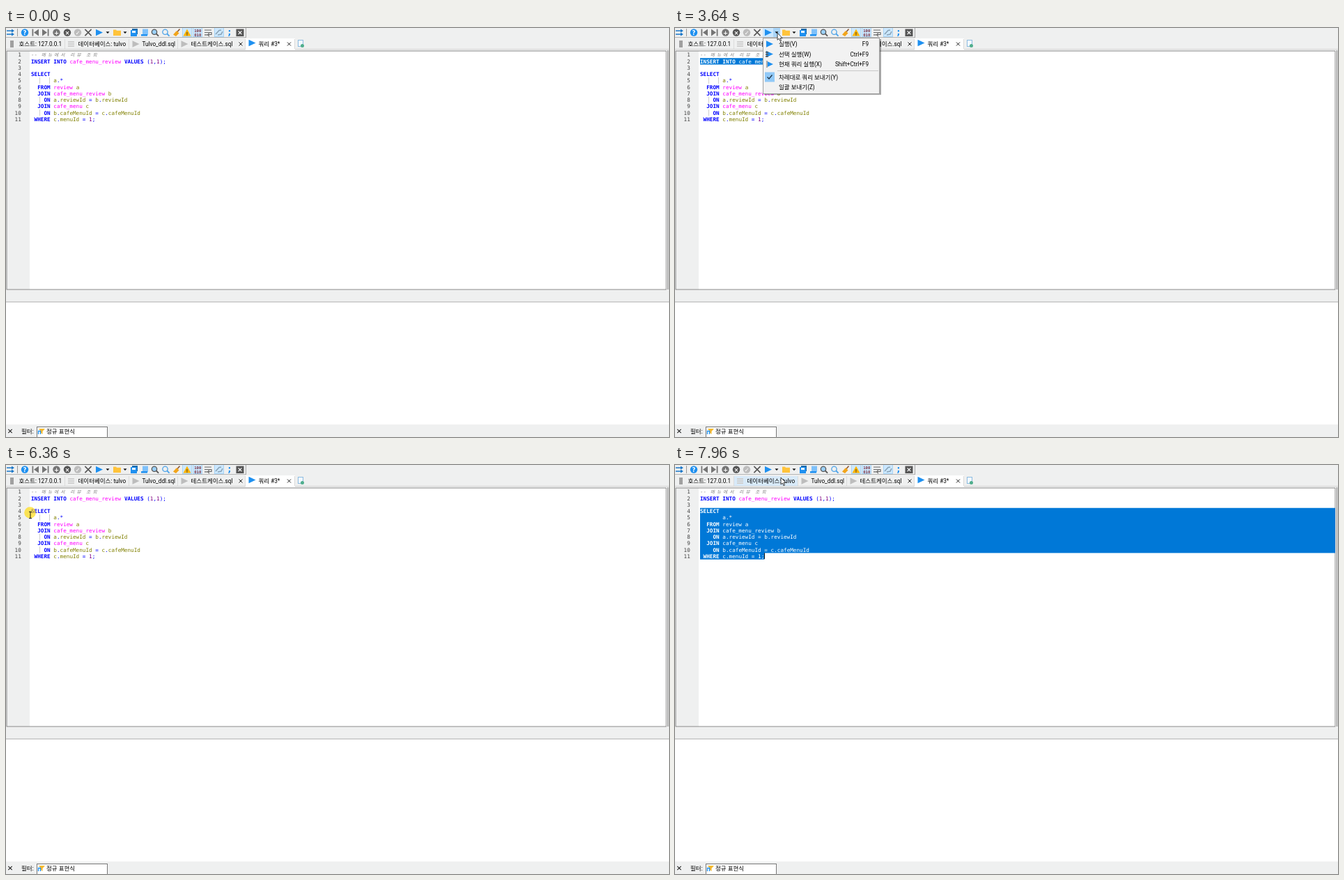
Recreate the animation shown at these times as an HTML page with a canvas. Size 952x588 px, loop 8 s.

```html
<!DOCTYPE html>
<html lang="ko">
<head>
<meta charset="utf-8">
<style>
  html, body { margin: 0; width: 100%; height: 100%; overflow: hidden; background: #fff; }
  canvas { display: block; }
</style>
</head>
<body>
<canvas id="stage" width="952" height="588"></canvas>
<script>
const ctx = document.getElementById('stage').getContext('2d');
const LOOP = 8000;
const CODE_X = 36, CHAR = 4.617, ROW = 9.25, CODE_TOP = 33.9, EDITOR_RIGHT = 948;
const BLUE = '#1e90f0', GRAY = '#757575', BAR = '#eff0f0', SELECT = '#0078d7', HOVER = '#91c9f7';
const HANGUL = '"Noto Sans CJK KR", "Noto Sans CJK JP", sans-serif';
const MONO = '"DejaVu Sans Mono", monospace';

// ---- drawing helpers ----
function box(color, x, y, w, h) {
  ctx.fillStyle = color;
  ctx.fillRect(x, y, w, h);
}
function frame(color, x, y, w, h) {
  ctx.strokeStyle = color;
  ctx.lineWidth = 1;
  ctx.strokeRect(x + .5, y + .5, w - 1, h - 1);
}
function disc(color, x, y, r) {
  ctx.beginPath();
  ctx.arc(x, y, r, 0, 7);
  ctx.fillStyle = color;
  ctx.fill();
}
// SVG path placed at x, y; filled, or stroked when a width is given.
function shape(color, path, x, y, width) {
  ctx.save();
  ctx.translate(x, y);
  ctx.fillStyle = ctx.strokeStyle = color;
  ctx.lineWidth = width;
  width ? ctx.stroke(new Path2D(path)) : ctx.fill(new Path2D(path));
  ctx.restore();
}
function write(text, x, y, color, font, align = 'left') {
  ctx.font = font;
  ctx.fillStyle = color;
  ctx.textAlign = align;
  ctx.fillText(text, x, y);
}
const play = (color, x, y) => shape(color, 'M-4.5-4.7 5.5 0-4.5 4.7z', x, y);
const cross = (color, x, y, r, width = 1.1) =>
  shape(color, `M${-r} ${-r}L${r} ${r}M${-r} ${r}L${r} ${-r}`, x, y, width);

// Interface text: Hangul and Latin runs have their own size.
function label(text, x, y) {
  for (const run of text.match(/[가-힣]+|[^가-힣]+/g) || []) {
    write(run, x, y + 3, '#000', /[가-힣]/.test(run) ? `8.5px ${HANGUL}` : '8.2px Roboto, sans-serif');
    x += ctx.measureText(run).width;
  }
}

// ---- code ----
const CODE = `
INSERT INTO cafe_menu_review VALUES (1,1);

SELECT
       a.*
  FROM review a
  JOIN cafe_menu_review b
    ON a.reviewId = b.reviewId
  JOIN cafe_menu c
    ON b.cafeMenuId = c.cafeMenuId
 WHERE c.menuId = 1;`.split('\n');
const rowTop = row => CODE_TOP + (row - 1) * ROW;
const baseline = row => rowTop(row) + 7.4;
const colX = col => CODE_X + col * CHAR;

function inkOf(token) {
  if (/^[A-Z]+$/.test(token)) return '#0000ff';
  if (/^(cafe_\w+|review)$/.test(token)) return '#ff00ff';
  if (/^\d/.test(token)) return '#800080';
  return /^\w/.test(token) ? '#808000' : '#0000ff';
}
function drawCode(plain) {
  CODE.forEach((text, i) => {
    for (const { 0: token, index } of text.matchAll(/\w+|[^\w\s]+/g)) {
      const weight = /^[A-Z]+$/.test(token) ? 'bold' : 'normal';
      write(token, colX(index), baseline(i + 1), plain || inkOf(token), `${weight} 7.67px ${MONO}`);
    }
  });
}
function drawComment() {
  write('--', CODE_X, baseline(1), '#858585', `italic 7.67px ${MONO}`);
  let col = 3;
  for (const ch of '메뉴에서 리뷰 조회') {
    write(ch, colX(col) + .8, baseline(1) - .4, '#858585', `italic 6.6px ${HANGUL}`);
    col += ch === ' ' ? 1 : 2;
  }
}
function drawSelection({ from, to, col }) {
  ctx.save();
  ctx.beginPath();
  ctx.rect(CODE_X, rowTop(from), EDITOR_RIGHT - CODE_X, (to - from) * ROW);
  ctx.rect(CODE_X, rowTop(to), col * CHAR, ROW);
  ctx.clip();
  box(SELECT, 0, 0, EDITOR_RIGHT, 200);
  drawCode('#fff');
  ctx.restore();
}
function drawEditor(selection, caret) {
  box('#fff', 0, 32, 952, 345);
  box(BAR, 1, 33, 33, 343);
  box(BAR, 949, 32, 3, 345);
  frame('#828282', .5, 32.5, 948, 344);
  box('#828282', 950, 32, 1, 344);
  CODE.forEach((_, i) => write(i + 1, 21.8, baseline(i + 1), '#444', `7.67px ${MONO}`, 'right'));
  for (const row of [5, 8, 10]) box('#cfcfcf', 48, rowTop(row), 1, ROW);
  box('#cfcfcf', 62, rowTop(5), 1, ROW);
  drawComment();
  drawCode();
  if (selection) drawSelection(selection);
  if (caret) box('#111', colX(caret.col) - .3, rowTop(caret.to), 1, ROW - .5);
}

// ---- toolbar ----
function badge(x, color, glyph) {
  disc(color, x, 6.5, 5.2);
  write(glyph, x, 9.6, '#fff', 'bold 8.5px "DejaVu Sans", sans-serif', 'center');
}
function drawToolbar(menuOpen, pointer) {
  box(BAR, 0, 0, 952, 32);
  box('#b5b5b5', 0, 13, 344, 1);
  box('#a5a5a5', 344, 0, 1, 14);
  box('#999', 16, 1, 1, 11);
  if (menuOpen || (pointer && pointer.y < 13)) {
    box('#cce8ff', 126, 0, 25, 13);
    box('#a9d5f8', 141, 0, 10, 13);
  }
  for (const x of [253, 268, 299]) {
    box('#cce8ff', x, 0, 14, 13);
    frame('#a8d4f5', x, -1, 14, 14);
  }
  shape('#1976c8', 'M1 3.3h7V1.5l4 2.5-4 2.5V4.7H1zM1 8.3h7V6.5l4 2.5-4 2.5V9.7H1z', 0, 0);
  badge(27, BLUE, '?');
  shape(GRAY, 'M-4.5-5h1.8v10h-1.8zM5-5v10l-7-5z', 42, 6.5);
  shape(GRAY, 'M4.5-5h-1.8v10h1.8zM-5-5v10l7-5z', 57, 6.5);
  badge(72.5, GRAY, '+');
  badge(88, '#555', '×');
  badge(103, '#bcbcbc', '✓');
  cross('#555', 118, 6.5, 4.6, 1.6);
  play(BLUE, 133.5, 6.5);
  for (const x of [146, 171]) shape('#111', 'M-2.5-1.2h5L0 1.5z', x, 6.5);
  shape('#ffc33b', 'M-5-4h4l1 1.2h6v7.3H-5z', 159, 6.5);
  box('#1769aa', 181, 1, 8, 8);
  box(BLUE, 179, 3, 9, 9);
  box('#e5f3ff', 181, 4, 5, 3);
  box('#7ec1fa', 196, 1.5, 8, 8.5);
  box(BLUE, 194, 9, 9, 2.5);
  for (const [x, rim, glass] of [[213, '#555', '#9bd0fa'], [228.5, '#4ca3e8', BAR]]) {
    shape(rim, 'M2.5 2.5l3.6 3.6', x, 5.5, 1.8);
    disc(rim, x, 5.7, 4.3);
    disc(glass, x, 5.7, 3);
  }
  shape('#8d5a36', 'M4.5-5L1-1', 245, 6.5, 1.6);
  shape('#f2a51b', 'M0-2.5L3.5 1-1 5.5-5 3z', 245, 6.5);
  shape('#ffb300', 'M0-5L5.5 5h-11z', 260, 6.5);
  write('!', 260, 10.8, '#333', 'bold 7px Roboto, sans-serif', 'center');
  ['100', '010'].forEach((bits, i) => write(bits, 270.2, 5.8 + i * 5.8, '#7a3040', `bold 5.6px ${MONO}`));
  shape('#666', 'M-5-3.5H5M-5 0H5V3H1M-5 3.3h4M2 1L-.5 3.2 2 5.5', 290, 6.5, 1.2);
  shape('#8aa3b5', 'M-5 2.5L0-3l3-.5M-2 3.5l5-1 2-4', 306, 6.5, 1.6);
  write(';', 321, 10, BLUE, 'bold 12px "DejaVu Sans", sans-serif', 'center');
  box('#555', 330.5, 1.5, 11, 10.5);
  cross('#fff', 336, 6.7, 2.4, 1.2);
}

// ---- tabs and lower panes ----
const TABS = [
  { left: 0, right: 85, text: '호스트: 127.0.0.1' },
  { left: 85, right: 177, text: '데이터베이스: tulvo' },
  { left: 177, right: 247, text: 'Tulvo_ddl.sql' },
  { left: 247, right: 344, text: '테스트케이스.sql' },
  { left: 344, right: 415, text: '쿼리 #3*', active: true }
];
function drawTabs(pointer) {
  box('#d5d5d5', 0, 30, 952, 1);
  for (const { left, right, text, active } of TABS) {
    const over = pointer && pointer.y > 14 && pointer.y < 31 && pointer.x >= left && pointer.x < right;
    if (active) box('#fff', left, 15, right - left, 17);
    else if (over) box('#d8eaf9', left, 16, right - left, 14);
    box('#dcdcdc', right - 1, 16, 1, 14);
    label(text, left + 18.5, 23);
    if (text.endsWith('.sql')) play('#bdbdbd', left + 9, 23);
  }
  play(BLUE, 353, 21.5);
  box('#a0a0a0', 6, 18, 5, 10);
  for (let y = 19; y < 27; y += 3) box('#d0d0d0', 89, y, 9, 2);
  for (const x of [337, 406.5]) cross('#222', x, 23, 2.5, 1);
  box('#f3f9ff', 419, 17, 8, 10);
  frame('#8bbbe0', 419, 17, 8, 10);
  disc('#4fae8c', 425.5, 25.5, 2.5);
}
function drawLowerPanes() {
  box(BAR, 0, 377, 952, 17);
  box('#a0a0a0', 0, 393.5, 952, 1);
  box('#fff', 0, 394.5, 952, 176);
  box(BAR, 0, 570, 952, 18);
  cross('#222', 6, 579.5, 2.7);
  label('필터:', 22, 580);
  box('#fff', 44, 573, 102, 15);
  frame('#777', 44, 573, 102, 17);
  shape('#f5b82e', 'M-4-4h9L1.5 0v4L-1 2V0z', 51, 580);
  shape(BLUE, 'M0 4.5V0h3v4.5', 46.5, 579.5, 1.3);
  label('정규 표현식', 58, 580);
}

// ---- drop-down menu ----
const MENU_OPENS = 3300, MENU_CLOSES = 4830;
const MENU = [
  ['실행(V)', 'F9'], ['선택 실행(W)', 'Ctrl+F9'], ['현재 쿼리 실행(X)', 'Shift+Ctrl+F9'],
  ['차례대로 쿼리 보내기(Y)'], ['일괄 보내기(Z)']
];
function drawMenu(alpha, pointer) {
  ctx.globalAlpha = alpha;
  box('rgba(0,0,0,.35)', 128, 16, 168, 80);
  box('#f2f2f2', 126, 14, 168, 81);
  frame('#a0a0a0', 126, 14, 168, 81);
  box('#c8c8c8', 147, 61, 145, 1);
  MENU.forEach(([text, keys], i) => {
    const y = 23 + i * 14.5 + (i > 2 ? 4 : 0);
    if (Math.abs(pointer.y - y) < 7.25) box(HOVER, 128, y - 7.2, 164, 14.4);
    if (i < 3) play(BLUE, 135.5, y);
    label(text, 149, y);
    if (keys) write(keys, 278, y + 3, '#000', '8.2px Roboto, sans-serif', 'right');
  });
  for (let y = 34; y < 42; y += 3) box('#555', 130, y, 4, 1.6);
  box('#aaa', 131, 47, 2, 10);
  box(HOVER, 129, 63.5, 14, 14);
  shape('#203040', 'M-3.5 0L-1 2.5l4.5-5.5', 136, 70.5, 1.2);
  ctx.globalAlpha = 1;
}

// ---- pointer ----
// Each move slows down towards its end; drags are nearly even.
const START = { start: 130, end: 130, x: 775, y: 506 };
const FIRST_DRAG = { start: 1650, end: 2250, release: 2510, x: 230, y: 46.5 };
const SECOND_DRAG = { start: 6490, end: 7360, release: 7430, x: 129, y: 131 };
const MOVES = [
  START,
  { start: 130, end: 920, x: 38, y: 37.5 },
  { start: 990, end: 1060, x: 38, y: 46.5 },
  FIRST_DRAG,
  { start: 2780, end: 3224, x: 147, y: 7 },
  { start: 3640, end: 4040, x: 164, y: 44 },
  { start: 4230, end: 4430, x: 164, y: 39 },
  { start: 4830, end: 5230, x: 152, y: 40.5 },
  { start: 5560, end: 5900, x: 80, y: 79 },
  { start: 5900, end: 6360, x: 35, y: 65.5 },
  SECOND_DRAG,
  { start: 7430, end: 7960, x: 152, y: 18 }
];
const PRESS = 6330;
const between = (t, start, end) => t >= start && t < end;

function pointerAt(t) {
  const i = MOVES.findLastIndex(move => t >= move.start);
  if (i < 1) return null;
  const from = MOVES[i - 1], to = MOVES[i];
  const progress = Math.min(1, (t - to.start) / (to.end - to.start));
  const k = 1 - (1 - progress) ** (to.release ? 1.2 : 2);
  return { x: from.x + (to.x - from.x) * k, y: from.y + (to.y - from.y) * k };
}
function drawPointer({ x, y }, arrow, pressed) {
  if (pressed) disc('rgba(255,218,0,.65)', x - .5, y + 3, 8.3);
  if (arrow) {
    const path = 'M0 0V10L2.3 8 4 11.6 5.5 11 4 7.4H7z';
    shape('#fff', path, x, y);
    shape('#111', path, x, y, .8);
  } else {
    shape('#111', 'M-2-4.7H2M-2 4.7H2M0-4.7V4.7', x, y + 6.5, 1);
  }
}

function selectionAt(t, pointer) {
  if (between(t, FIRST_DRAG.start, PRESS)) {
    const col = t < FIRST_DRAG.end ? Math.floor((pointer.x - CODE_X) / CHAR) : CODE[1].length;
    return { from: 2, to: 2, col };
  }
  if (t < SECOND_DRAG.start) return null;
  const { x, y } = t < SECOND_DRAG.end ? pointer : SECOND_DRAG;
  const col = Math.max(0, Math.floor((x - CODE_X) / CHAR));
  return { from: 4, to: Math.floor((y - CODE_TOP) / ROW) + 1, col };
}
function caretAt(t, selection) {
  if (between(t, 1250, FIRST_DRAG.start)) return { to: 2, col: 0 };
  const visible = between(t, FIRST_DRAG.start, FIRST_DRAG.release) || between(t, MENU_CLOSES, 5420);
  return visible || t >= SECOND_DRAG.start ? selection : null;
}

function draw(t) {
  const pointer = pointerAt(t);
  const selection = selectionAt(t, pointer);
  const menuOpen = between(t, MENU_OPENS, MENU_CLOSES);
  const pressed = between(t, FIRST_DRAG.start, FIRST_DRAG.release) || between(t, PRESS, SECOND_DRAG.release);
  drawToolbar(menuOpen, pointer);
  drawTabs(menuOpen ? null : pointer);
  drawEditor(selection, caretAt(t, selection));
  drawLowerPanes();
  if (menuOpen) drawMenu(Math.min(1, (t - MENU_OPENS) / 270), pointer);
  if (pointer) {
    const inEditor = pointer.y > 33 && pointer.y < 376;
    drawPointer(pointer, !inEditor || menuOpen || t > SECOND_DRAG.start, pressed);
  }
}

const began = performance.now();
function tick() {
  draw((performance.now() - began) % LOOP);
  requestAnimationFrame(tick);
}
tick();
</script>
</body>
</html>
```
